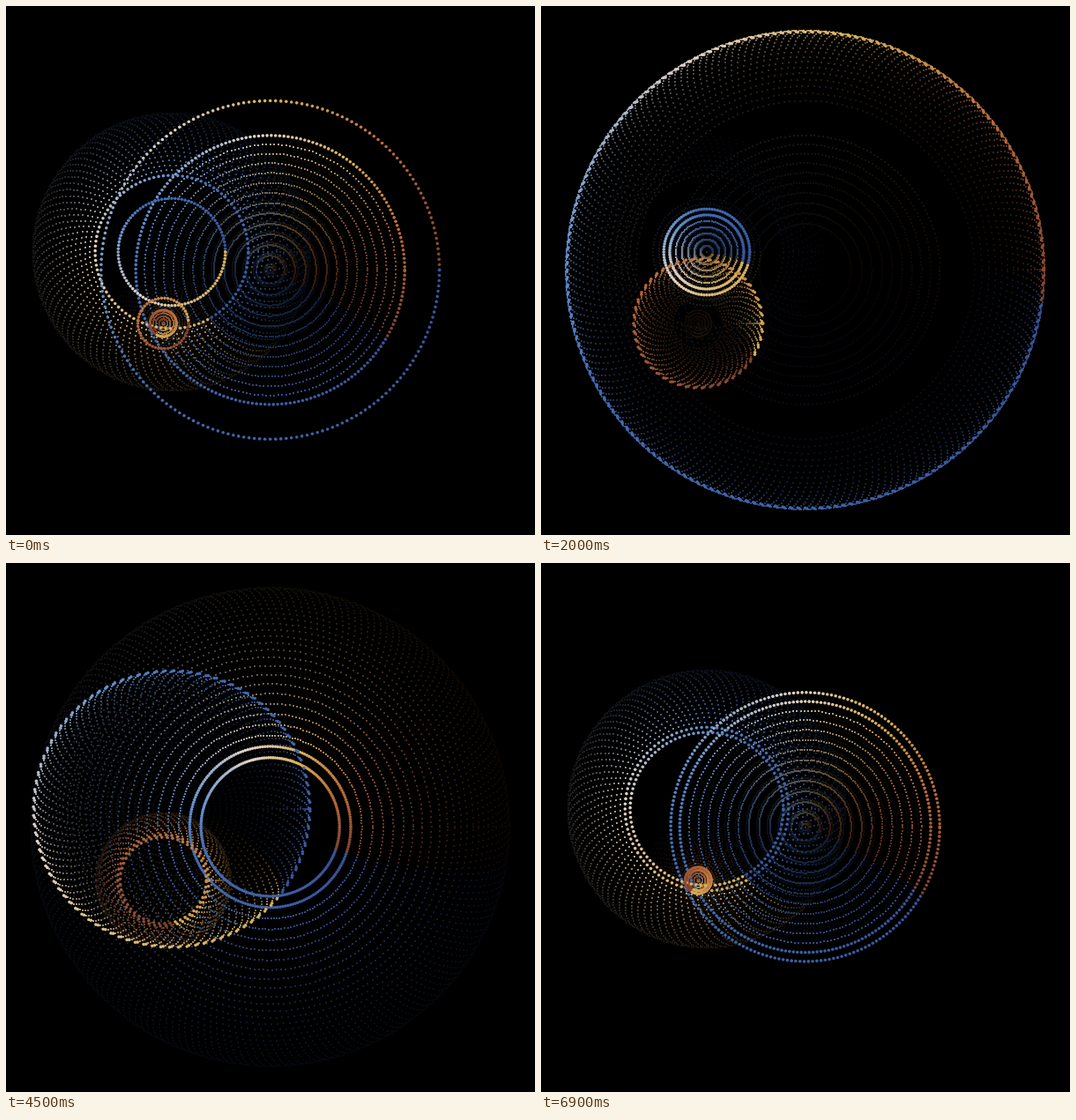
These frames come from a looping animation (600 px wide and 600 px high, 7 s). An HTML page with a canvas:

```html
<!DOCTYPE html>
<html lang="en">
<head>
<meta charset="utf-8">
<title>Pulsing rings</title>
<style>
  html, body { margin: 0; width: 100%; height: 100%; overflow: hidden; background: #000; }
  canvas { display: block; width: 600px; height: 600px; }
</style>
</head>
<body>
<canvas id="stage" width="600" height="600"></canvas>
<script>
const ctx = document.getElementById('stage').getContext('2d');
const TAU = 2 * Math.PI;
const STEPS = 70, STEP_MS = 100, TRAIL = 30, FADE = 0.9, HOLD = 0.185;

// The gradient runs blue, white, gold, brown; each stop has its position.
const stops = [
  [0, 54, 84, 152], [0.4, 68, 110, 182], [0.5, 108, 150, 206], [0.65, 226, 212, 200],
  [0.76, 218, 176, 88], [0.87, 186, 108, 60], [1, 126, 66, 46]
];

function gradient(p) {
  const i = Math.max(1, stops.findIndex(s => s[0] >= p));
  const [a, ...low] = stops[i - 1], [b, ...high] = stops[i];
  return low.map((v, k) => v + (high[k] - v) * (p - a) / (b - a));
}

// `zero` is the phase at which a ring shrinks to a point; `shade` maps 0..1 to the gradient.
const rings = [
  { x: 299.7, y: 299.4, size: 271.5, count: 200, phase: 0.785, zero: Math.PI, shade: u => u },
  { x: 188, y: 279, size: 157.5, count: 100, phase: -0.396, zero: 0, shade: u => 0.76 * (1 - u ** 1.8) },
  { x: 178.3, y: 360, size: 76.5, count: 50, phase: 0.385, zero: Math.PI, shade: u => 1 - 0.24 * u }
];
for (const r of rings) {
  r.colors = Array.from({ length: r.count }, (_, i) => gradient(r.shade(i / r.count)));
}

// Steady pace with a slightly quicker stretch after the halfway point.
const travel = step => 0.0448 * step + 0.0047 * Math.min(10, Math.max(0, step - 35));

// |sin| pulse that rests for a moment at zero.
function radius(ring, step) {
  let p = ring.phase + travel(step);
  if (p > ring.zero) p = Math.max(ring.zero, p - HOLD);
  return ring.size * Math.abs(Math.sin(p));
}

function dot(x, y, color, age) {
  const light = age < 2 ? 1 : FADE ** age;
  ctx.fillStyle = `rgb(${color.map(v => Math.round(v * light)).join()})`;
  if (age < 2) {
    ctx.beginPath();
    ctx.arc(x, y, 1.8, 0, TAU);
    ctx.fill();
  } else {
    ctx.fillRect(Math.round(x - 1), Math.round(y - 1), 2, 2);
  }
}

function drawRing(ring, step, age) {
  const { x, y, count, colors } = ring;
  const r = radius(ring, step);
  for (let i = 0; i < count; i++) {
    const a = (i + step / 4) * TAU / count;
    dot(x + r * Math.cos(a), y + r * Math.sin(a), colors[i], age);
  }
  // One dot always stays on the horizontal axis.
  dot(x + r, y, colors[(count - Math.floor(step / 4)) % count], age);
}

function draw(step) {
  ctx.fillStyle = '#000';
  ctx.fillRect(0, 0, 600, 600);
  for (let age = TRAIL; age >= 0; age--) {
    for (const ring of rings) drawRing(ring, (step - age + STEPS) % STEPS, age);
  }
}

const start = performance.now();
let shown = -1;
function tick() {
  const step = Math.floor(Math.max(0, performance.now() - start) / STEP_MS) % STEPS;
  if (step !== shown) draw(shown = step);
  requestAnimationFrame(tick);
}
tick();
</script>
</body>
</html>
```
